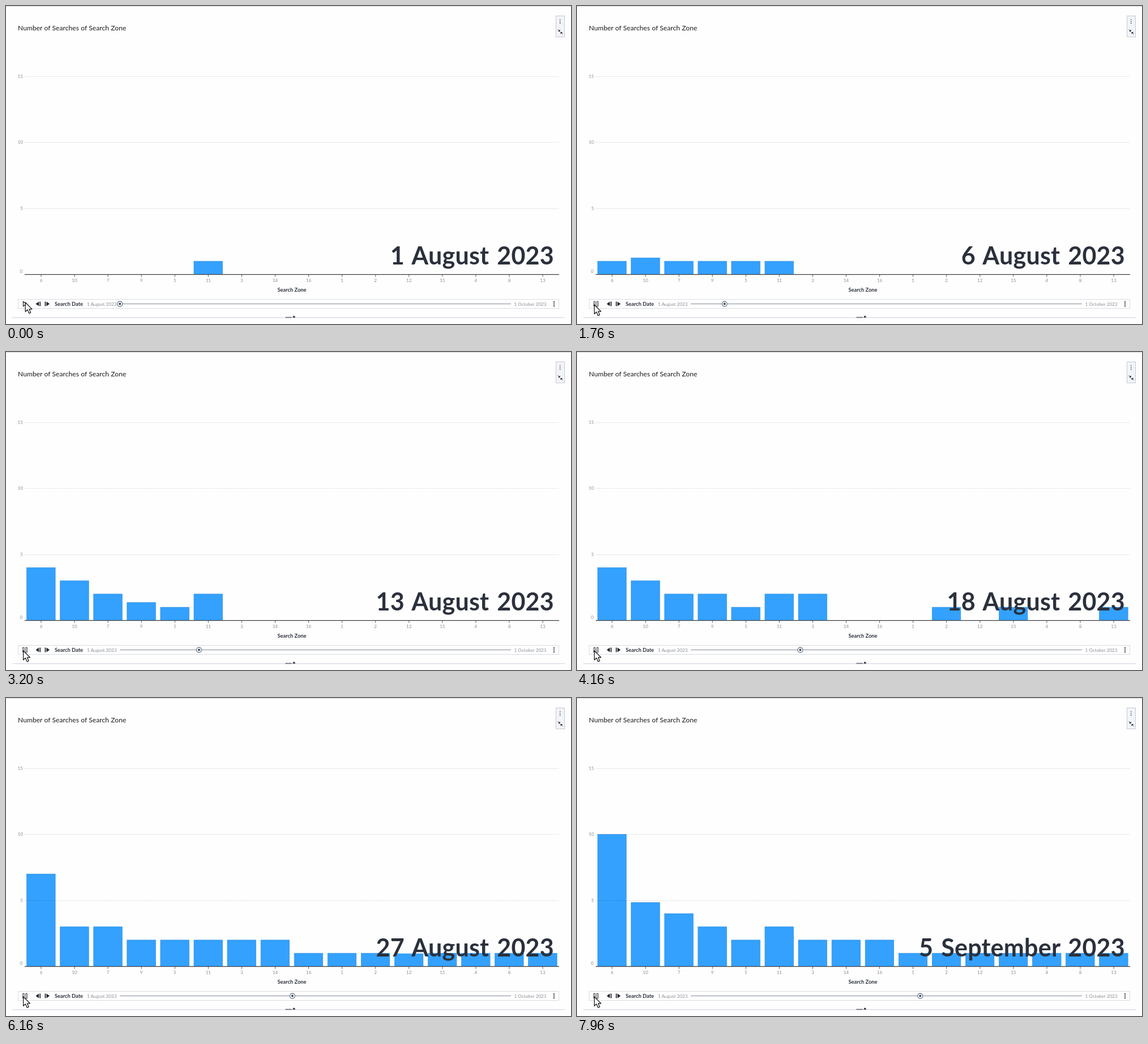
Recreate the animation shown at these times as an HTML page. Size 998x561 px, loop 8000 ms.

```html
<!DOCTYPE html>
<html lang="en">
<head>
<meta charset="utf-8">
<title>Searches by zone</title>
<style>
  html, body { margin: 0; width: 100%; height: 100%; overflow: hidden; background: #fefefe; }
  svg { display: block; }
  text { font-family: Lato, "Open Sans", sans-serif; font-size: 8.1px; fill: #8a8e96; }
  .title { font-size: 12px; letter-spacing: .09px; fill: #15181d; }
  .strong { font-size: 9.3px; font-weight: 700; fill: #2b303c; }
  .date { font-size: 43px; font-weight: 700; letter-spacing: .25px; word-spacing: 3.2px; fill: #2b303c; text-anchor: end; }
  .middle { text-anchor: middle; }
  .end { text-anchor: end; }
  .bar { fill: #33a1fd; stroke: #3390dd; stroke-width: .7; }
  .grid { stroke: #000; stroke-opacity: .17; stroke-dasharray: 1 1; }
  .axis { stroke: #3c3f45; }
  .icon { fill: #20242c; }
  .outline { fill: #fff; stroke: #20242c; }
</style>
</head>
<body>
<svg width="998" height="561" viewBox="0 0 998 561">
  <path d="M0 .5H998" stroke="#d4d6dc"/>
  <text class="title" x="21" y="43">Number of Searches of Search Zone</text>

  <rect x="971.5" y="17.5" width="15" height="37" fill="#f3f4f9" stroke="#c3c9d8"/>
  <g class="icon">
    <circle cx="978.7" cy="24" r=".8"/><circle cx="978.7" cy="27.2" r=".8"/><circle cx="978.7" cy="30.4" r=".8"/>
    <path d="M978.6 41.4V45H975zM979.6 46H983.2L979.6 49.6z"/>
    <path d="M974.8 41.2L978 44.4M983.4 49.8L980.2 46.6" stroke="#20242c"/>
  </g>

  <g id="bars"></g>
  <g id="scale"></g>
  <path class="axis" d="M33 473.6H977" stroke-width="1.2"/>
  <g id="zones"></g>
  <text class="strong middle" x="505" y="504">Search Zone</text>
  <text class="date" id="date" x="968" y="455.5"></text>

  <rect x="21.5" y="517.5" width="955" height="16" fill="none" stroke="#d9dce2"/>
  <path id="play" class="outline" d="M30.5 521.5V529.5L36.5 525.5z" stroke-width="1.3"/>
  <path id="pause" class="outline" d="M29.7 521.2h2.4v8.6h-2.4zM34.9 521.2h2.4v8.6h-2.4z" stroke-width=".9"/>
  <path class="icon" d="M58 521.5V529.5L52.5 525.5zM59.3 521.5h1.7v8h-1.7zM68.6 521.5h1.7v8h-1.7zM71.5 521.5V529.5L77 525.5z"/>
  <text class="strong" x="86" y="528.5">Search Date</text>
  <text x="143" y="528.5">1 August 2023</text>
  <path d="M201 525.5H892" stroke="#848b98"/>
  <text class="end" x="954.5" y="528.5">1 October 2023</text>
  <g class="icon"><circle cx="968" cy="522.2" r="1.1"/><circle cx="968" cy="525.7" r="1.1"/><circle cx="968" cy="529.2" r="1.1"/></g>
  <g id="knob">
    <circle r="4.5" fill="#fff" stroke="#5d6a80" stroke-width="1.1"/>
    <circle r="2" fill="#39465c"/>
  </g>

  <path d="M11 549.8H987" stroke="#ccd1e3"/>
  <path d="M494 549.4H504" stroke="#20242c" stroke-width="1.6" stroke-dasharray="1.6 1.2"/>
  <path class="icon" d="M505.8 549.6L508.6 546L511.4 549.6z"/>
  <path id="cursor" d="M0 0V16.3L3.8 12.8L6.6 19.2L9.5 18L6.8 11.8H11.8z" fill="#fff" stroke="#111" stroke-width="1.2" stroke-linejoin="round"/>
</svg>
<script>
const LOOP = 8000, PLAY_AT = 760, CLOCK_START = 696, MS_PER_DAY = 202.7;
const BASE = 473.5, UNIT = 23.28;

// Zone, then the days (after 1 August) on which its count has grown by one.
const zones = [
  [6, [5, 8, 10, 12, 19, 22, 24, 31, 32, 34]],
  [10, [4, 6, 9, 29, 36]],
  [7, [3, 11, 21, 35]],
  [9, [2, 13, 28]],
  [5, [1, 23]],
  [11, [0, 7, 34]],
  [3, [14, 16]],
  [14, [19, 21]],
  [16, [26, 29]],
  [1, [20]],
  [2, [15]],
  [12, [27]],
  [15, [14]],
  [4, [26]],
  [8, [24]],
  [13, [16]],
];

const $ = id => document.getElementById(id);
const clamp = v => Math.max(0, Math.min(1, v));
const zoneX = i => 62 + i * 59.07;

function add(parent, tag, attrs, label = '') {
  const node = document.createElementNS('http://www.w3.org/2000/svg', tag);
  for (const name in attrs) node.setAttribute(name, attrs[name]);
  node.textContent = label;
  return $(parent).appendChild(node);
}

for (const value of [5, 10, 15]) {
  const y = Math.floor(BASE - value * UNIT) + .5;
  add('scale', 'path', { class: 'grid', d: `M33 ${y}H977` });
  add('scale', 'text', { class: 'end', x: 30, y: y + 2.7 }, value);
}
add('scale', 'text', { class: 'end', x: 29.3, y: 471 }, 0);

const bars = zones.map(([zone], i) => {
  const x = zoneX(i);
  add('zones', 'path', { class: 'axis', d: `M${x} 474v4`, 'stroke-width': .8 });
  add('zones', 'text', { class: 'middle', x, y: 487.3 }, zone);
  return add('bars', 'rect', { class: 'bar', x: x - 25.4, width: 50.5 });
});

function draw(t) {
  const playing = t >= PLAY_AT;
  const day = playing ? (t - CLOCK_START) / MS_PER_DAY : 0;

  zones.forEach(([, growth], i) => {
    const count = growth.reduce((sum, d) => sum + clamp(day - d + 1), 0);
    bars[i].setAttribute('y', BASE - count * UNIT);
    bars[i].setAttribute('height', count * UNIT);
    bars[i].setAttribute('visibility', count ? 'visible' : 'hidden');
  });

  const n = Math.floor(day) + 1;
  $('date').textContent = n > 31 ? `${n - 31} September 2023` : `${n} August 2023`;
  $('knob').setAttribute('transform', `translate(${201.2 + 11.3 * day} 525.6)`);
  $('play').setAttribute('visibility', playing ? 'hidden' : 'visible');
  $('pause').setAttribute('visibility', playing ? 'visible' : 'hidden');

  const moved = clamp((t - 180) / 120);
  $('cursor').setAttribute('transform', `translate(${34.2 - 3.6 * moved} ${523 + 4 * moved})`);
}

const start = performance.now();
function frame() {
  draw((performance.now() - start) % LOOP);
  requestAnimationFrame(frame);
}
frame();
</script>
</body>
</html>
```
